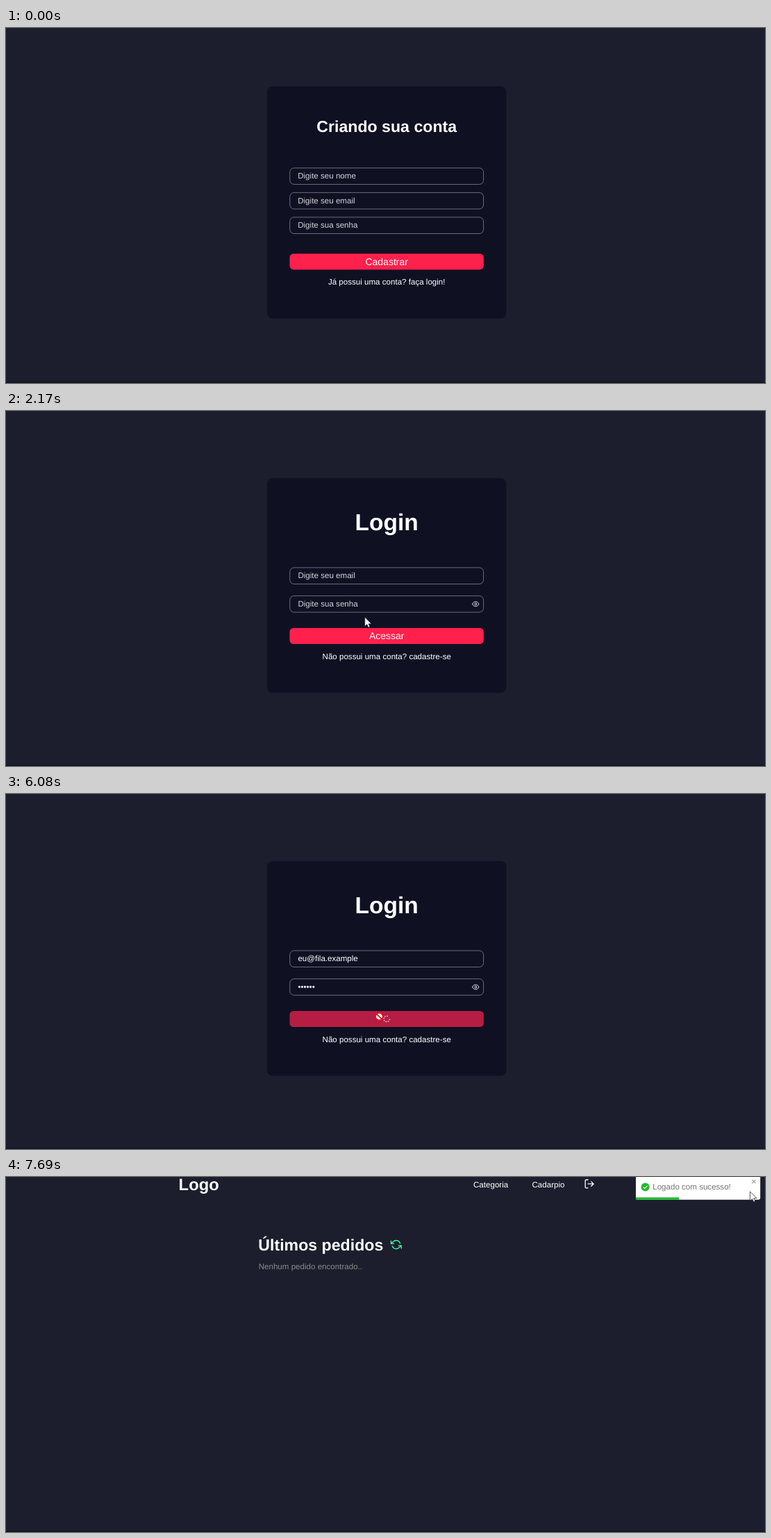
Animation, 1093 px wide and 512 px high, one loop 8000 ms. Source, as an HTML page:

```html
<!DOCTYPE html>
<html lang="pt-BR">
<head>
<meta charset="utf-8">
<title>Login</title>
<style>
  html, body { margin: 0; width: 100%; height: 100%; overflow: hidden; background: #1d1e2d; }
  svg { display: block; width: 100%; height: 100%; }
  text { font: 11.58px "Liberation Sans", Arial, sans-serif; fill: #fff; text-rendering: geometricPrecision; white-space: pre; }
  .mid { text-anchor: middle; }
  .title { font-weight: 700; font-size: 23.15px; }
  .big { font-weight: 700; font-size: 33.6px; }
  .btn { font-size: 14px; }
  .hint { fill: #d2d2d6; }
  .muted { fill: #8a8a8a; }
  .toast { fill: #757575; }
  .status { font-size: 8.6px; fill: #b8b8b8; text-anchor: end; }
  .card { fill: #101023; }
  .field { fill: none; stroke: #83838b; stroke-width: .8; }
  .red { fill: #ff204c; }
  .icon { fill: none; stroke: #fff; stroke-width: 2; stroke-linecap: round; stroke-linejoin: round; }
  .shape { fill: #fff; stroke: #14141c; stroke-width: .7; stroke-linejoin: round; }
</style>
</head>
<body>
<svg viewBox="0 0 1093 512" preserveAspectRatio="none">
  <rect width="1093" height="512" fill="#1d1e2d"/>
  <rect y="510" width="1093" height="2" fill="#151625"/>

  <g id="signup">
    <rect class="card" x="376" y="84" width="344.5" height="335" rx="8"/>
    <text class="title mid" x="548.2" y="150.3">Criando sua conta</text>
    <rect class="field" x="408.8" y="201.9" width="278.8" height="23.6" rx="6"/>
    <rect class="field" x="408.8" y="237.4" width="278.8" height="23.6" rx="6"/>
    <rect class="field" x="408.8" y="272.9" width="278.8" height="23.6" rx="6"/>
    <text class="hint" x="420.2" y="217">Digite seu nome</text>
    <text class="hint" x="420.2" y="252.5">Digite seu email</text>
    <text class="hint" x="420.2" y="288">Digite sua senha</text>
    <rect class="red" x="408.5" y="325.4" width="279.4" height="23" rx="5.5"/>
    <text class="btn mid" x="548.2" y="341.8">Cadastrar</text>
    <text id="toLogin" class="mid" x="548.2" y="370">Já possui uma conta? faça login!</text>
  </g>

  <g id="login">
    <rect class="card" x="376" y="96.7" width="344.5" height="309.8" rx="8"/>
    <text class="big mid" x="548.2" y="172.4">Login</text>
    <rect class="field" x="408.8" y="225.9" width="278.8" height="23.6" rx="6"/>
    <rect class="field" x="408.8" y="266.6" width="278.8" height="23.6" rx="6"/>
    <text id="email" x="420.4" y="241.2"></text>
    <text id="pass" x="420.4" y="282"></text>
    <rect id="caret" width=".9" height="12.6" fill="#fff"/>
    <g class="icon" transform="translate(676.3 278.4) scale(.43)">
      <path d="M-11 0C-7-10.500 7-10.500 11 0C7 10.500-7 10.500-11 0Z"/><circle r="3.4"/>
    </g>
    <rect id="send" class="red" x="408.5" y="313" width="279.4" height="23" rx="5.5"/>
    <text id="sendText" class="btn mid" x="548.2" y="329.2">Acessar</text>
    <g id="spinner" fill="#dcc9d3"></g>
    <text id="toSignup" class="mid" x="548.2" y="357.5">Não possui uma conta? cadastre-se</text>
  </g>

  <g id="home">
    <text class="title" style="font-size:23.8px" x="248.6" y="19">Logo</text>
    <text x="673" y="15">Categoria</text>
    <text x="757.5" y="15">Cadarpio</text>
    <path class="icon" transform="translate(832.2 2) scale(.66)" d="M9 21H5a2 2 0 0 1-2-2V5a2 2 0 0 1 2-2h4M16 17l5-5-5-5M21 12H9"/>
    <text class="title" x="363.3" y="106.2">Últimos pedidos</text>
    <path id="refresh" class="icon" transform="translate(553.8 89.500) scale(.67)" d="M1 4v6h6M23 20v-6h-6M20.49 9A9 9 0 0 0 5.640 5.640L1 10M23 14l-4.640 4.360A9 9 0 0 1 3.510 15"/>
    <text class="muted" x="363.7" y="133">Nenhum pedido encontrado..</text>
    <g id="toast">
      <rect x="907" y="-13" width="179.2" height="45.8" rx="3" fill="#fff"/>
      <rect id="bar" x="907" y="29.4" height="3.4" fill="#20b92f"/>
      <circle cx="920.6" cy="14.4" r="6" fill="#20b92f"/>
      <path d="M917.800 14.600l2 2 3.700-4" fill="none" stroke="#fff" stroke-width="1.2"/>
      <text class="toast" x="931.2" y="18.4">Logado com sucesso!</text>
      <path d="M1074.300 3.800l5.200 5.200m0-5.200l-5.200 5.200" stroke="#a0a0a0" stroke-width="1.1"/>
    </g>
  </g>

  <g id="status">
    <rect id="statusBar" y="508" height="4" fill="#000"/>
    <text id="statusText" class="status" y="517"></text>
  </g>

  <g id="cursor">
    <path id="arrow" class="shape" d="M0 0V13.200L3.100 10.400L5.200 15L7.300 14L5.300 9.600H9.500Z"/>
    <path id="hand" class="shape" d="M-1 1.500C-1-.5 2-.5 2 1.500V6L8 7.200Q8.900 7.500 8.800 9L8 14Q7.600 18 6 18H1Q-1 18-2.500 14.500L-6 10.500Q-5 8.600-3 10L-1 11.500Z"/>
    <path id="beam" d="M-4-7.200H-1Q0-7.200 0-6.200Q0-7.200 1-7.200H4M0-6.500V6.500M-4 7.200H-1Q0 7.200 0 6.200Q0 7.200 1 7.200H4" fill="none" stroke="#eeeee8" stroke-width="1.3"/>
    <g id="block" stroke="#dc1428" stroke-width="1.9">
      <circle r="5.3" fill="#fff"/><path d="M-3.700-3.700L3.700 3.700"/>
    </g>
  </g>
</svg>
<script>
const LOOP = 8000;
const OPEN_LOGIN = 1640, SEND = 6010, OPEN_HOME = 6310;
const el = {};
document.querySelectorAll('[id]').forEach(n => el[n.id] = n);

const show = (node, on) => { node.style.display = on ? '' : 'none'; };
const set = (node, attrs) => { for (const k in attrs) node.setAttribute(k, attrs[k]); };
const within = (t, a, b) => t >= a && t < b;
const clamp = v => Math.max(0, Math.min(1, v));

// time, x, y of the pointer's hot spot
const path = [
  [180, 912, 508], [400, 760, 430], [640, 600, 360], [960, 545, 361],
  [1300, 533, 365], [1900, 533, 366], [2200, 515, 290], [2450, 506, 240],
  [3040, 506, 240], [3400, 508, 284], [3670, 504, 276], [5390, 504, 276],
  [5520, 530, 274], [5670, 534, 292], [5870, 537.4, 321], [6310, 537.4, 321],
  [6580, 555, 314], [6800, 765, 165], [7050, 1079, 14], [7250, 1083, 12],
  [7690, 1071.5, 21]
];
const typed = [4200, 4330, 4460, 4730, 4860, 5060];

function pointer(t) {
  const i = path.findIndex(p => p[0] > t);
  if (i < 0) return path[path.length - 1].slice(1);
  const [a, b] = [path[Math.max(0, i - 1)], path[i]];
  const u = a === b ? 0 : (t - a[0]) / (b[0] - a[0]);
  return [a[1] + (b[1] - a[1]) * u, a[2] + (b[2] - a[2]) * u];
}

// y of cubic-bezier(.215, .61, .355, 1) at x
function easeOut(x) {
  let lo = 0, hi = 1;
  const bez = (p, q, s) => 3 * p * s * (1 - s) ** 2 + 3 * q * s * s * (1 - s) + s ** 3;
  for (let i = 0; i < 20; i++) {
    const m = (lo + hi) / 2;
    if (bez(.215, .355, m) < x) lo = m; else hi = m;
  }
  return bez(.61, 1, lo);
}

function bounceIn(p) {
  const stops = [[0, 3000], [.6, -25], [.75, 10], [.9, -5], [1, 0]];
  const i = stops.findIndex(s => s[0] > p);
  if (i < 1) return i < 0 ? 0 : 3000;
  const [a, b] = [stops[i - 1], stops[i]];
  return (a[1] + (b[1] - a[1]) * easeOut((p - a[0]) / (b[0] - a[0]))) * .72;
}

// seven dots with one gap at the upper right
for (let i = 0; i < 7; i++) {
  const dot = document.createElementNS('http://www.w3.org/2000/svg', 'circle');
  const a = i * Math.PI / 4;
  set(dot, { cx: 4.2 * Math.cos(a), cy: 4.2 * Math.sin(a), r: .9 });
  el.spinner.append(dot);
}

function drawLogin(t) {
  const filled = t >= 2840;
  el.email.textContent = filled ? 'eu@fila.example' : 'Digite seu email';
  el.email.setAttribute('class', filled ? '' : 'hint');

  const count = typed.filter(k => t >= k).length;
  el.pass.textContent = count ? '•'.repeat(count) : 'Digite sua senha';
  el.pass.setAttribute('class', count ? '' : 'hint');

  const onEmail = within(t, 2450, 3340);
  show(el.caret, onEmail || within(t, 3500, 4000) || within(t, 4200, 5520));
  set(el.caret, {
    x: onEmail ? (filled ? 507 : 420.2) : 420.2 + count * 4.06,
    y: onEmail ? 231.2 : 271.8
  });

  const busy = t >= SEND;
  el.send.style.fill = busy ? '#b61d42' : '';
  show(el.sendText, !busy);
  show(el.spinner, busy);
  set(el.spinner, { transform: `translate(548.2 324.4) rotate(${(t - SEND) * .18})` });
}

function drawHome(t) {
  el.refresh.style.stroke = t < 7050 ? '#49bfb8' : '#3fffa3';
  set(el.toast, { transform: `translate(${bounceIn((t - 6150) / 700)} 0)` });
  set(el.bar, { width: 179.2 * Math.max(.348, 1 - clamp((t - 6850) / 1200)) });
}

function drawStatus(t) {
  const link = within(t, 1040, 2100), load = within(t, OPEN_HOME, 7000);
  show(el.status, link || load);
  set(el.statusBar, { width: load ? 363 : 47 });
  set(el.statusText, { x: load ? 56 : 43 });
  el.statusText.textContent = load ? 'Aguardando localhost...' : 'localhost:3000';
}

function drawPointer(t, page) {
  const [x, y] = pointer(t);
  const over = (x0, y0, x1, y1) => x >= x0 && x <= x1 && y >= y0 && y <= y1;
  const toLogin = page === 'signup' && over(464, 358, 632, 373);
  const toSignup = page === 'login' && over(456, 347, 640, 360);
  const button = page === 'login' && over(408, 313, 688, 336);
  const field = page === 'login' && (over(408, 226, 688, 250) || over(408, 266, 688, 290.5));
  const kind = button && t >= SEND ? 'block'
    : toLogin || toSignup || button ? 'hand'
    : field ? 'beam' : 'arrow';
  el.toLogin.style.fill = toLogin ? '#ff204c' : '';
  el.toSignup.style.fill = toSignup ? '#ff204c' : '';
  for (const k of ['arrow', 'hand', 'beam', 'block']) show(el[k], k === kind);
  show(el.cursor, t >= 180);
  set(el.cursor, { transform: `translate(${x} ${y})` });
}

function draw(t) {
  const page = t < OPEN_LOGIN ? 'signup' : t < OPEN_HOME ? 'login' : 'home';
  for (const p of ['signup', 'login', 'home']) show(el[p], p === page);
  if (page === 'login') drawLogin(t);
  if (page === 'home') drawHome(t);
  drawStatus(t);
  drawPointer(t, page);
}

const start = performance.now();
function tick() {
  draw((performance.now() - start) % LOOP);
  requestAnimationFrame(tick);
}
tick();
</script>
</body>
</html>
```
